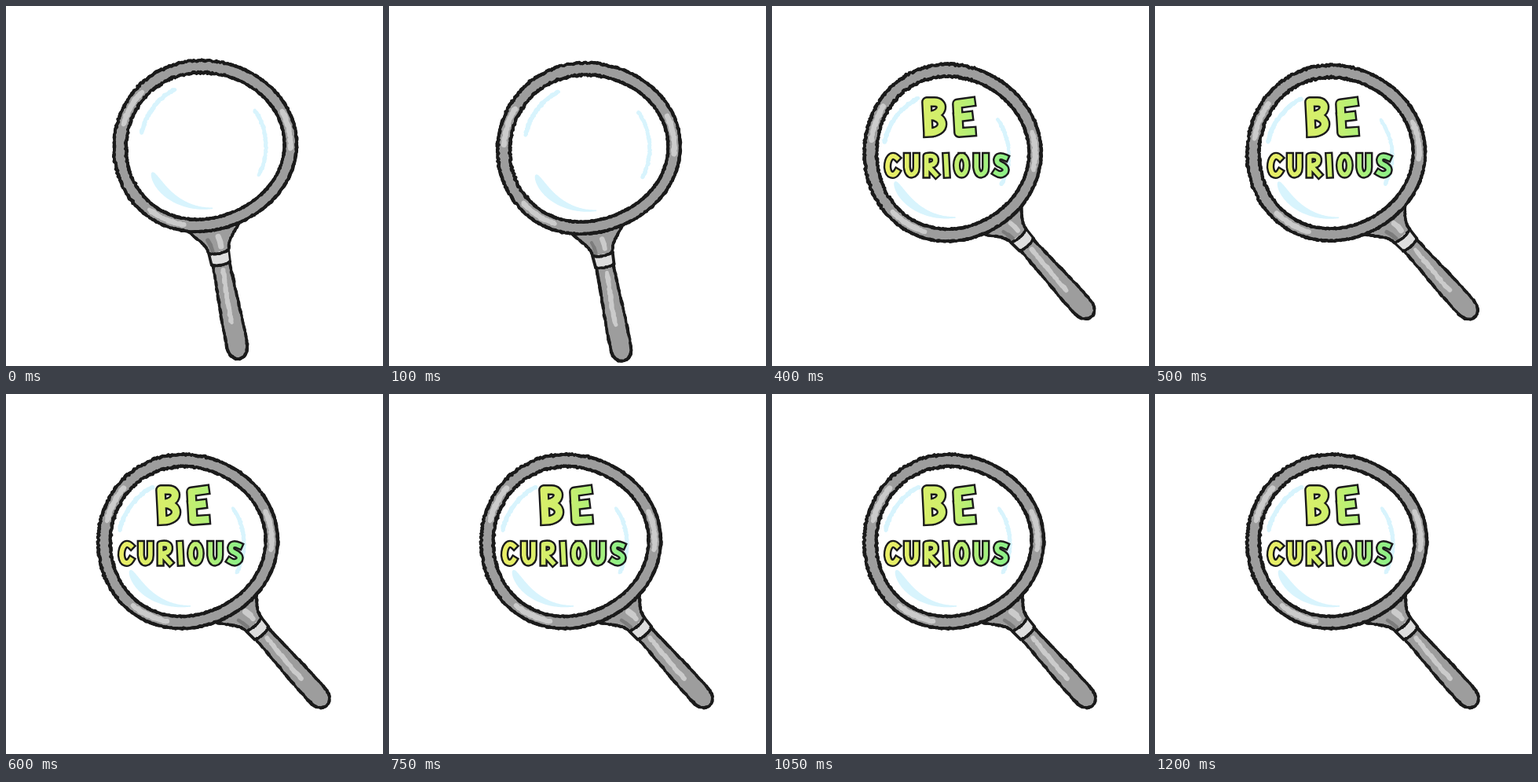
An HTML page with a canvas that plays this animation: 480x458 px, repeating every 1300 ms.

```html
<!DOCTYPE html>
<html lang="en">
<head>
<meta charset="utf-8">
<title>Be curious</title>
<style>
html, body { margin: 0; width: 100%; height: 100%; overflow: hidden; background: #fff; }
canvas { display: block; }
</style>
</head>
<body>
<canvas id="stage" width="480" height="458" role="img" aria-label="Magnifying glass: BE CURIOUS"></canvas>
<script>
const ctx = document.getElementById('stage').getContext('2d');
const INK = '#1b1b1b', GREY = '#9d9d9d', LIGHT = '#cbcbcb', DARK = '#7c7c7c', GLINT = '#d8f4fd';
const RAD = Math.PI / 180, RIM = 112.5, LENS = 97;

// Lens centre, handle angle and how far the ring is drawn out sideways.
const pose = (seed, x, y, turn, oval) => ({ seed, c: [x, y], turn, oval });
const leaning = pose(13, 228.5, 186.7, 48, 0);
const between = pose(34, 229, 187, 48, 1);
const swung = pose(21, 230, 187.5, 48, 2);

const intro = [
  [pose(3, 252, 178, 79, 4), 100], [pose(5, 253, 181, 79, 4), 100],
  [pose(11, 243, 174, 65, 2), 100], [pose(8, 244, 176.5, 65, 2), 100]
];
const wobble = [[leaning, 100], [between, 100], [swung, 100], [leaning, 50], [swung, 100]];
const steps = [...intro, ...wobble, ...wobble];
const loop = steps.reduce((sum, [, ms]) => sum + ms, 0);

function random(seed) {
  let s = seed * 7919 + 17;
  return () => (s = (s * 16807) % 2147483647) / 2147483647;
}
const polar = ([x, y], r, deg) => [x + r * Math.cos(deg * RAD), y + r * Math.sin(deg * RAD)];

// Slightly oval, slightly three-cornered.
const bulge = (deg, oval) => oval * Math.cos((2 * deg + 20) * RAD) + 1.7 * Math.cos(3 * deg * RAD);

function arc(c, radius, from, to) {
  const n = Math.round(Math.abs(to - from)), pts = [];
  for (let i = 0; i <= n; i++) {
    const deg = from + (to - from) * i / n;
    pts.push(polar(c, radius(deg, i / n), deg));
  }
  return pts;
}

function bezier(p, c1, c2, q) {
  const pts = [];
  for (let i = 0; i <= 24; i++) {
    const t = i / 24, s = 1 - t;
    pts.push([0, 1].map(k =>
      s * s * s * p[k] + 3 * s * s * t * c1[k] + 3 * s * t * t * c2[k] + t * t * t * q[k]));
  }
  return pts;
}

function trace(pts) {
  ctx.beginPath();
  pts.forEach(p => ctx.lineTo(...p));
}
function fill(pts, color) {
  trace(pts);
  ctx.fillStyle = color;
  ctx.fill();
}

// Dry-brush line: short pieces of uneven width.
function brush(pts, width, color, rnd, rough = 0.7) {
  ctx.strokeStyle = color;
  let last = pts[0];
  for (const p of pts.slice(1)) {
    const q = p.map(v => v + (rnd() - 0.5) * rough);
    ctx.lineWidth = width * (0.8 + 0.4 * rnd());
    trace([last, q]);
    ctx.stroke();
    last = q;
  }
}

function drawHandle({ c, turn }, rnd) {
  ctx.save();
  ctx.translate(...polar(c, 136, turn + 3));
  ctx.rotate(turn * RAD);

  const side = s => bezier([-34, 34 * s], [-20, 25 * s], [-14, 14 * s], [0, 13 * s]);
  fill([...side(1), ...side(-1).reverse()], GREY);
  brush([[-17, 11], [-10, 9], [-3, 8]], 5, DARK, rnd);
  brush([[-19, -3], [-12, -4], [-6, -4]], 7, LIGHT, rnd);
  [1, -1].forEach(s => brush(side(s), 3.5, INK, rnd));

  fill([[0, 13], [15, 12], [15, -12], [0, -13]], '#dedede');

  const edge = [
    ...bezier([15, 11], [50, 11], [85, 14], [122, 13]),
    ...bezier([122, 13], [144, 12], [144, -12], [122, -13]),
    ...bezier([122, -13], [85, -14], [50, -11], [15, -11])
  ];
  fill(edge, GREY);
  brush(bezier([24, -1], [48, 0], [72, 2], [92, 1]), 5.5, LIGHT, rnd, 1.2);
  brush(edge, 3.8, INK, rnd);
  for (const s of [1, -1]) brush([[0, 13 * s], [15, 12 * s]], 3.3, INK, rnd);
  for (const x of [0, 15]) brush(bezier([x, 12], [x + 3, 6], [x + 3, -6], [x, -12]), 3.2, INK, rnd);
  ctx.restore();
}

function drawGlints([x, y], turn, rnd) {
  const lean = (79 - turn) / 31;
  const c = [x - 6 * lean, y + 3 * lean];
  brush(arc(c, () => 81, 192, 243), 5, GLINT, rnd, 1.2);
  brush(arc(c, () => 79, -35, 28), 4.5, GLINT, rnd, 1.2);
  // Broad smear that thins out to the right.
  const smear = side => (deg, t) => 74 + 6 * t + side * (0.8 + 5.5 * Math.sin(Math.PI * t ** 0.6) * (1 - t / 2));
  fill([...arc(c, smear(1), 153, 82), ...arc(c, smear(-1), 153, 82).reverse()], GLINT);
}

function drawRing({ c, turn, oval }, rnd) {
  const edge = r => deg => r + bulge(deg, oval);
  fill(arc(c, edge(RIM), 0, 360), GREY);
  for (const start of [182, 100, -28]) {
    const from = start + 14 * rnd();
    brush(arc(c, edge((RIM + LENS) / 2), from, from + 26), 6, LIGHT, rnd, 1.2);
  }
  fill(arc(c, edge(LENS), 0, 360), '#fff');
  drawGlints(c, turn, rnd);

  // The upper left of the rim is drawn with a drier brush.
  for (const r of [RIM, LENS]) {
    brush(arc(c, edge(r), -72, 140), 4, INK, rnd, 0.8);
    brush(arc(c, edge(r), 140, 288), 4, INK, rnd, 1.8);
  }
}

// Pen strokes on a 10 by 10 grid.
const glyphs = {
  B: 'M1 10L0 0H5C11 0 11 4 2 4.5C12 4.5 13 10 1 10',
  E: 'M8.5 0L0 .6L1 10L9 9.7M.5 5L7 4.6',
  C: 'M10 1C4-2 0 2 0 6C1 11 7 11 10 8.5',
  U: 'M0 0V6Q1 10 5 10Q10 9.5 10 6V0',
  R: 'M0 10V0Q10-1 9.5 2.5Q9 5 1 5L10 10',
  I: 'M0 0L1 10',
  O: 'M5 0C12 0 12 10 5 10C-2 10-2 0 5 0',
  S: 'M10 .8Q2-1 1 2Q1 4 5 4.6Q12 6 10 8.5Q6 11 0 9'
};
const tint = ctx.createLinearGradient(143, 0, 304, 0);
tint.addColorStop(0, '#ebee66');
tint.addColorStop(0.5, '#cdef6c');
tint.addColorStop(1, '#88f08a');

function drawWord(word, x, y, w, h, gap, pen) {
  for (const ch of word) {
    const path = new Path2D();
    path.addPath(new Path2D(glyphs[ch]), new DOMMatrix([w / 10, 0, 0, h / 10, x, y]));
    for (const [color, width] of [[INK, pen + 4.8], [tint, pen]]) {
      ctx.strokeStyle = color;
      ctx.lineWidth = width;
      ctx.stroke(path);
    }
    x += gap + (ch === 'I' ? w / 10 : w);
  }
}

function draw(step) {
  const [shape] = step, rnd = random(shape.seed);
  ctx.fillStyle = '#fff';
  ctx.fillRect(0, 0, 480, 458);
  ctx.lineCap = ctx.lineJoin = 'round';
  drawHandle(shape, rnd);
  drawRing(shape, rnd);
  if (intro.includes(step)) return;
  ctx.lineCap = 'square';
  drawWord('BE', 197, 122, 20, 39, 19, 9);
  drawWord('CURIOUS', 147, 191, 12, 23.5, 12.8, 5.6);
}

const start = performance.now();
let shown = null;
function tick() {
  let left = (performance.now() - start) % loop;
  const step = steps.find(([, ms]) => (left -= ms) < 0);
  if (step !== shown) draw(shown = step);
  requestAnimationFrame(tick);
}
tick();
</script>
</body>
</html>
```
